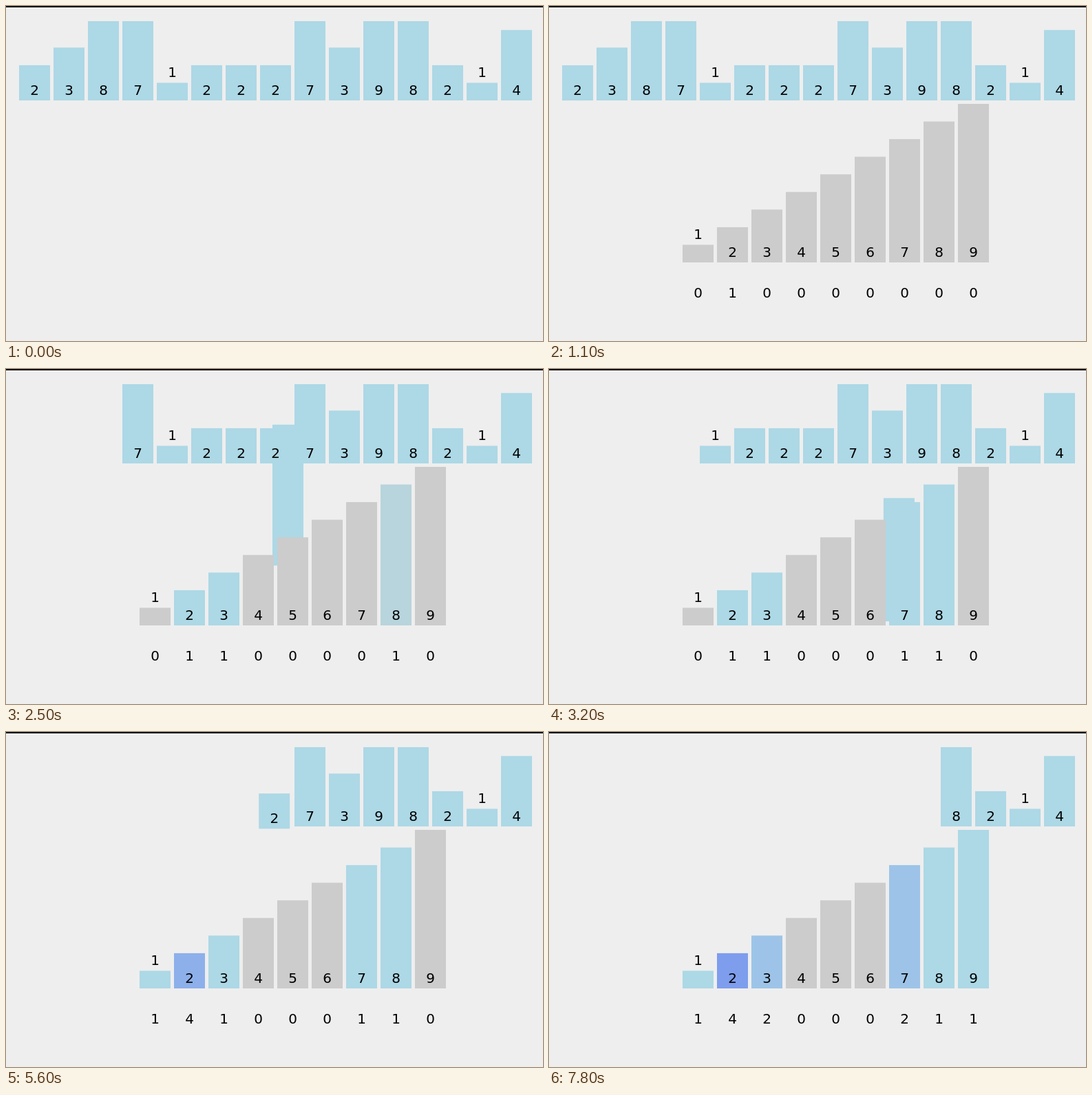
Animation, 780 px wide and 486 px high, one loop 8000 ms. Source, as an HTML page with a canvas:

```html
<!DOCTYPE html>
<html lang="en">
<head>
<meta charset="utf-8">
<title>Counting sort</title>
<style>
  html, body { margin: 0; height: 100%; overflow: hidden; background: #eee; }
  canvas { display: block; }
</style>
</head>
<body>
<canvas id="stage" width="780" height="486"></canvas>
<script>
const ctx = document.getElementById('stage').getContext('2d');
const values = [2, 3, 8, 7, 1, 2, 2, 2, 7, 3, 9, 8, 2, 1, 4];
const LOOP = 8000, TICK = 100, DURATION = 250;
const BUILD_START = 448;
const moveStarts = [1089, 1730, 2363, 2996, 3638, 4280, 4930, 5562, 6197, 6847, 7489];
const UNIT = 230 / 9, BAR = 45, GAP = 50;
const TOP = { x: 19, base: 137 }, BINS = { x: 194, base: 372 };
const CLIP_Y = 22, COUNT_Y = 423;
const GREY = [204, 204, 204], LIGHT = [173, 216, 230], BLUE = [0, 0, 255];

const lerp = (a, b, p) => a + (b - a) * p;
const mix = (a, b, p) => a.map((c, i) => lerp(c, b[i], p));
const css = color => `rgb(${color.map(Math.round)})`;
const countColor = n => n ? mix(LIGHT, BLUE, (n - 1) / 11) : GREY;

function ease(time) {
  const t = Math.min(1, Math.max(0, time / DURATION));
  return t < 0.5 ? 4 * t ** 3 : 1 - 4 * (1 - t) ** 3;
}

function drawText(text, x, y) {
  ctx.fillStyle = '#000';
  ctx.fillText(text, x + BAR / 2, y);
}

// Bars grow from their top left corner; a label too tall for its bar sits above it.
function drawBar(value, x, base, color, scale = 1) {
  const height = value * UNIT;
  ctx.fillStyle = css(color);
  ctx.fillRect(x, base - height, BAR * scale, height * scale);
  drawText(value, x, (value === 1 ? base - height : base) - 8);
}

function drawItems(time) {
  ctx.save();
  ctx.beginPath();
  ctx.rect(0, CLIP_Y, 780, 486);
  ctx.clip();
  values.forEach((value, i) => {
    const p = i < moveStarts.length ? ease(time - moveStarts[i]) : 0;
    if (p === 1) return;
    const x = lerp(TOP.x + GAP * i, BINS.x + GAP * (value - 1), p);
    drawBar(value, x, lerp(TOP.base, BINS.base, p), LIGHT);
  });
  ctx.restore();
}

function drawBins(time) {
  const grow = ease(time - BUILD_START);
  for (let value = 1; value <= 9; value++) {
    const arrivals = moveStarts.filter((start, i) => values[i] === value && time >= start);
    const count = arrivals.length;
    const p = count ? ease(time - arrivals[count - 1]) : 0;
    const color = mix(countColor(Math.max(0, count - 1)), countColor(count), p);
    const x = BINS.x + GAP * (value - 1);
    drawBar(value, x, BINS.base, color.map(c => c * grow), grow);
    drawText(count, x, COUNT_Y);
  }
}

function draw(now) {
  const time = Math.floor(now % LOOP / TICK) * TICK;
  ctx.fillStyle = '#eee';
  ctx.fillRect(0, 0, 780, 486);
  ctx.fillStyle = '#000';
  ctx.fillRect(0, 0, 780, 2);
  ctx.font = '20px "DejaVu Sans", sans-serif';
  ctx.textAlign = 'center';
  drawItems(time);
  if (time >= BUILD_START) drawBins(time);
}

const begin = performance.now();
function frame() {
  draw(performance.now() - begin);
  requestAnimationFrame(frame);
}
frame();
</script>
</body>
</html>
```
